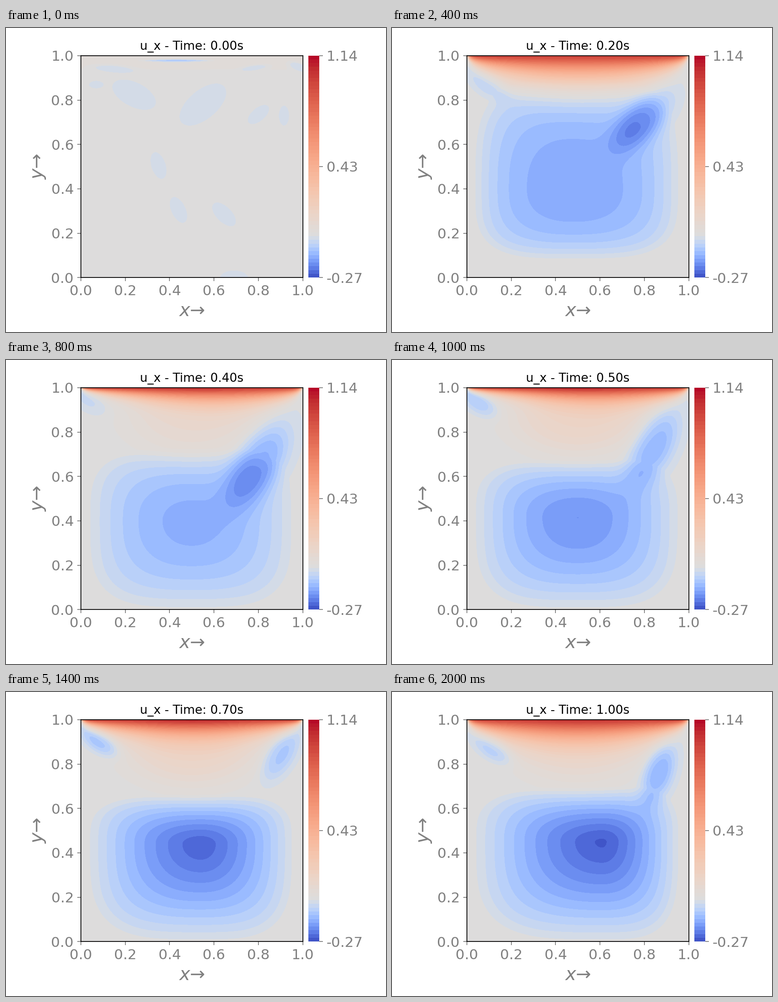
Recreate the animation shown at these times as a matplotlib script. Size 837 by 669 pixels, loop 2200 ms.

```python
import numpy as np
import matplotlib.pyplot as plt
from matplotlib.animation import FuncAnimation
from matplotlib.colors import ListedColormap

W, H, DPI = 837, 669, 128
S = 160 / DPI                      # point sizes are laid out for 160 dpi
VMIN, VMAX, BANDS = -0.27, 1.14, 59
STEP = (VMAX - VMIN) / BANDS
COUNT, INTERVAL = 11, 200
REST = 0.7                         # depth, in colour bands, of still fluid

levels = np.linspace(VMIN, VMAX, BANDS + 1)
mids = (levels[:-1] + levels[1:]) / 2
shifted = np.where(mids < 0, 0.5 + 0.5 * mids / -VMIN, 0.5 + 0.5 * mids / VMAX)
cmap = ListedColormap(plt.get_cmap("coolwarm")(shifted))

axis = np.linspace(0, 1, 251)
X, Y = np.meshgrid(axis, axis)

# Key poses of the vortex, the two corner eddies, the warm pool and the lid.
TIMES = [1, 2, 4, 6, 8, 10]
TRACKS = dict(
    well_x=[.53, .48, .5, .5, .58, .61],
    well_y=[.5, .4, .4, .43, .45, .45],
    well_top=[.7, .5, .33, .2, .25, .25],
    well_floor=[.08, .08, 0, 0, 0, 0],
    well_depth=[5.1, 5.9, 5.7, 8.9, 11.3, 10.5],
    well_power=[2.2, 3, 2.1, 1.6, 1.2, 1.4],
    right_x=[.78, .79, .8, .885, .91, .865],
    right_y=[.76, .71, .66, .82, .865, .765],
    right_size=[.14, .17, .21, .16, .1, .14],
    right_tilt=[30, 45, 58, 68, 50, 72],
    right_depth=[2.8, 5, 5.7, 5, 3.2, 5.4],
    left_x=[.07, .1, .035, .075, .1, .12],
    left_y=[.905, .87, .945, .925, .88, .87],
    left_depth=[5, 2.5, 1.6, 5, 4, 3.9],
    pool_depth=[0, 0, 3.7, 7.5, 2.9, 2.9],
    lid_width=[.085, .085, .05, .045, .075, .08],
)

# Faint patches of the still fluid: centre, length, tilt.
PATCHES = [
    (.55, .78, .13, 40), (.24, .825, .11, -27), (.07, .87, .035, 0),
    (.8, .735, .06, 40), (.915, .73, .047, 90), (.35, .505, .065, 108),
    (.44, .305, .065, 115), (.645, .285, .07, 135), (.69, 0, .065, 0),
]


def bump(x, y, a, b, tilt):
    """Smooth hill of height 1 with half axes a and b."""
    t = np.radians(tilt)
    u = (X - x) * np.cos(t) + (Y - y) * np.sin(t)
    v = (Y - y) * np.cos(t) - (X - x) * np.sin(t)
    return np.exp(-((u / a) ** 2 + (v / b) ** 2) ** 1.4)


def well(x, y, top, floor, depth, power):
    """Bowl reaching towards the walls, rounder inside and squarer outside."""
    u = np.abs(X - x) / np.where(X < x, x - 0.03, 0.96 - x)
    v = np.abs(Y - y) / np.where(Y < y, y - floor, top)
    p = 2 + 1.6 * np.minimum(u * u + v * v, 1)
    rho = (u ** p + v ** p) ** (1 / p)
    return depth * np.maximum(0, 1 - rho ** power)


def lid(width, skew):
    """Layer dragged along by the moving lid, thin at both corners."""
    side = 1 - np.abs(2 * X - 1) ** 40
    w = width * (1 + skew * (X - 0.5)) * (4 * X * (1 - X)) ** 0.6 + 0.003
    return 41 * side * np.exp(-((1 - Y) / w) ** 1.3)


def still():
    hills = [bump(x, y, a, 0.52 * a, tilt) for x, y, a, tilt in PATCHES]
    hills += [bump(.15, .94, .1, .018, -5), bump(.78, .945, .065, .013, 8),
              bump(.98, .95, .05, .02, -20), 2.6 * bump(.43, .978, .13, .006, 0)]
    patch = np.max(hills, axis=0)
    warm = 1.1 * np.exp(-((1 - Y) / 0.06) ** 2)
    return 0.37 + 1.6 * patch - warm * (1 - np.minimum(patch, 1))


def flow(i):
    k = {name: np.interp(i, TIMES, keys) for name, keys in TRACKS.items()}
    skew = 0.9 * np.exp(-((i - 4.5) / 1.5) ** 2)
    bowl = well(*(k["well_" + n] for n in ("x", "y", "top", "floor", "depth", "power")))
    size = k["right_size"]
    right = bump(k["right_x"], k["right_y"], size, size / 2, k["right_tilt"])
    left = bump(k["left_x"], k["left_y"], 0.1, 0.05, -35)
    pool = bump(0.5, 0.87, 0.3, 0.17, 0)
    return (REST + bowl + k["right_depth"] * right + k["left_depth"] * left
            - k["pool_depth"] * pool - lid(k["lid_width"], skew))


def velocity(i):
    depth = flow(i) if i else still()
    return np.clip(STEP * (REST - depth), VMIN + 1e-4, VMAX - 1e-4)


def place(x0, y0, x1, y1):
    return fig.add_axes([x0 / W, 1 - y1 / H, (x1 - x0) / W, (y1 - y0) / H])


plt.rcParams["font.family"] = "DejaVu Sans"
fig = plt.figure(figsize=(W / DPI, H / DPI), dpi=DPI, facecolor="white")
ax = place(164.7, 61, 653.9, 549.3)
cax = place(666, 60.5, 690, 549.3)

ticks = dict(labelsize=14 * S, colors="gray", length=3.5 * S, width=0.8 * S, pad=3.5 * S)
ax.tick_params(**ticks)
ax.set_xlabel(r"$x$→", fontsize=18 * S, color="gray", labelpad=4 * S)
ax.set_ylabel(r"$y$→", fontsize=18 * S, color="gray", labelpad=4 * S)
for spine in ax.spines.values():
    spine.set_linewidth(0.8 * S)
title = ax.set_title("", fontsize=12 * S, pad=6 * S)

cax.pcolormesh([0, 1], levels, mids[:, None], cmap=cmap, vmin=VMIN, vmax=VMAX)
cax.set_xticks([])
cax.yaxis.tick_right()
cax.set_yticks([VMIN, (VMIN + VMAX) / 2, VMAX], ["-0.27", "0.43", "1.14"])
cax.tick_params(axis="y", **ticks)
for spine in cax.spines.values():
    spine.set_visible(False)

shown = []


def draw(i):
    while shown:
        shown.pop().remove()
    shown.append(ax.contourf(X, Y, velocity(i), levels=levels, cmap=cmap,
                             vmin=VMIN, vmax=VMAX))
    ax.set(xlim=(0, 1), ylim=(0, 1))
    title.set_text(f"u_x - Time: {i / 10:.2f}s")
    return shown + [title]


anim = FuncAnimation(fig, draw, frames=COUNT, interval=INTERVAL,
                     init_func=lambda: draw(0), repeat=True, repeat_delay=0, blit=False)
plt.show()
```
